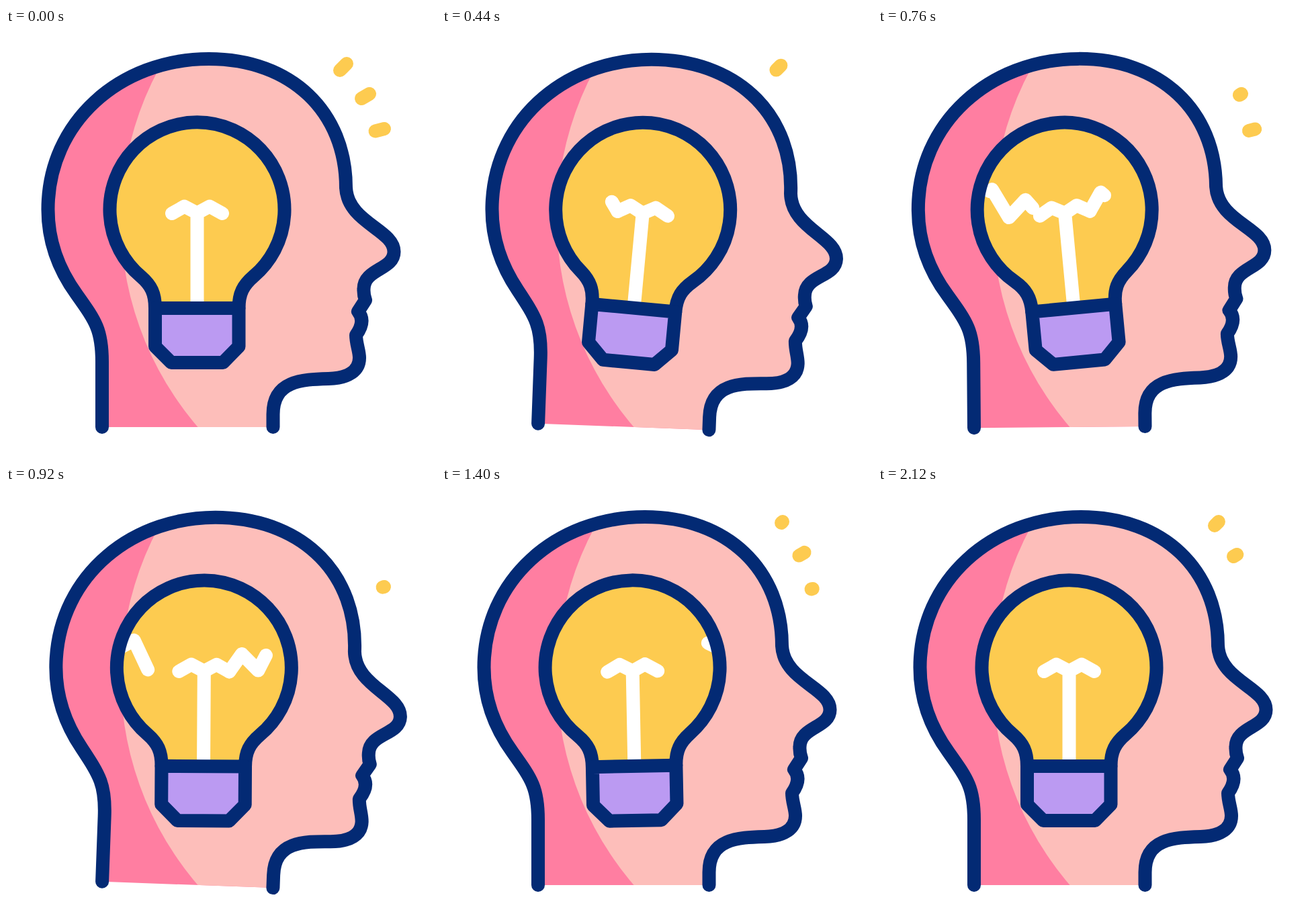
An HTML page that plays this animation: 640x640 px, repeating every 2160 ms.

```html
<!DOCTYPE html>
<html lang="en">
<head>
<meta charset="utf-8">
<title>Bright idea</title>
<style>
  html, body { margin: 0; width: 100%; height: 100%; overflow: hidden; background: #fff; }
  svg { display: block; width: 100%; height: 100%; }
  .line { fill: none; stroke: #032a74; }
  .wire { fill: none; stroke: #fff; }
  .ray { stroke: #fdcb50; }
  svg * { stroke-width: 20; stroke-linecap: round; stroke-linejoin: round; }
</style>
</head>
<body>
<svg viewBox="0 0 640 640">
  <defs>
    <path id="skull" d="M143 594V497C143 450 134 437 105.500 397C80 362 62.500 320 62.500 270
      C62.500 140 170 46 302 46C425 46 506 125 506 238C509 290 577.500 300 577.500 333
      C577.500 360 533 358 532.500 388Q532 397 535 405L524 422Q536 436 521 457
      C521 470 526 480 526 491C526 510 510 521 480 522C440 523 397.500 525 397.500 575V594"/>
    <path id="glass" d="M222 417C222 395 216 383 201 370A130 130 0 1 1 368 370C353 383 346.500 395 346.500 417"/>
    <clipPath id="inHead"><use id="clipSkull" href="#skull"/></clipPath>
    <clipPath id="inGlass"><circle cx="284.500" cy="270" r="126"/></clipPath>
  </defs>
  <use id="back" href="#skull" fill="#ff7ea1"/>
  <g clip-path="url(#inHead)"><circle cx="645" cy="285" r="474" fill="#fdbeba"/></g>
  <use id="outline" href="#skull" class="line"/>
  <g id="bulb">
    <use href="#glass" fill="#fdcb50"/>
    <g class="wire">
      <path d="M284.500 412V274M247 276L265.500 265.500L284.500 275.500L303 265.500L322 276"/>
      <g clip-path="url(#inGlass)">
        <path id="pulseL" d="M247 276L228 250L201 274L180 230L148 247"/>
        <path id="pulseR" d="M322 276L340.500 249.500L365 274L387 230.500L421 248"/>
      </g>
    </g>
    <use href="#glass" class="line"/>
    <path d="M222 417H346.500V474L323 498H246L222 474Z" fill="#bb9af2" stroke="#032a74"/>
  </g>
  <g id="rays"></g>
</svg>
<script>
const LOOP = 2160, STEP = 40;
const $ = id => document.getElementById(id);

// [time, degrees]
const headKeys = [[0, 0], [320, 4], [640, -2.1], [920, 2.1], [1200, 0]];
const bulbKeys = [[0, 0], [360, 4], [780, -5], [1080, 2.2], [1400, -1.1], [1680, 0]];

const pulses = [
  { el: $('pulseL'), head: 390, tail: 712, speed: 0.33 },
  { el: $('pulseR'), head: 640, tail: 975, speed: 0.3 }
];
for (const p of pulses) p.size = p.el.getTotalLength();

// inner end, outer end, start times
const rays = [
  { a: [497, 63], b: [507, 53], starts: [310, 1078, 1900] },
  { a: [529, 105], b: [541, 98], starts: [455, 1230, 2050] },
  { a: [549.5, 153.5], b: [563, 150], starts: [595, 1375] }
];
for (const r of rays) {
  r.el = document.createElementNS('http://www.w3.org/2000/svg', 'line');
  r.el.setAttribute('class', 'ray');
  $('rays').append(r.el);
}

const clamp = v => Math.max(0, Math.min(1, v));

function sway(keys, t) {
  for (let i = 1; i < keys.length; i++) {
    const [t0, v0] = keys[i - 1], [t1, v1] = keys[i];
    if (t < t1) return v0 + (v1 - v0) * (1 - Math.cos(Math.PI * (t - t0) / (t1 - t0))) / 2;
  }
  return 0;
}

const show = (el, on) => el.setAttribute('visibility', on ? 'visible' : 'hidden');

function drawPulse(p, t) {
  const head = Math.min(p.size, (t - p.head) * 0.33);
  const tail = Math.max(0, (t - p.tail) * p.speed);
  const on = head > 0 && tail < head;
  show(p.el, on);
  if (!on) return;
  p.el.setAttribute('stroke-dasharray', `${head - tail} 999`);
  p.el.setAttribute('stroke-dashoffset', -tail);
}

function raySpan(r, t) {
  if (t < 240) return [t / 240, 1];
  const start = r.starts.filter(s => s <= t).pop();
  if (start === undefined) return null;
  const age = t - start;
  if (age > 370) return null;
  return [clamp((age - 120) / 250), 1 - Math.pow(1 - clamp(age / 230), 1.6)];
}

function drawRay(r, t) {
  const span = raySpan(r, t);
  show(r.el, span);
  if (!span) return;
  span.forEach((k, i) => {
    r.el.setAttribute('x' + (i + 1), r.a[0] + (r.b[0] - r.a[0]) * k);
    r.el.setAttribute('y' + (i + 1), r.a[1] + (r.b[1] - r.a[1]) * k);
  });
}

function draw(t) {
  const nod = `rotate(${sway(headKeys, t)} 285 594)`;
  for (const id of ['clipSkull', 'back', 'outline']) $(id).setAttribute('transform', nod);
  $('bulb').setAttribute('transform', `${nod} rotate(${sway(bulbKeys, t)} 284.5 319)`);
  pulses.forEach(p => drawPulse(p, t));
  rays.forEach(r => drawRay(r, t));
}

const origin = performance.now();
function tick() {
  const t = (performance.now() - origin) % LOOP;
  draw(Math.floor(t / STEP) * STEP);
  requestAnimationFrame(tick);
}
tick();
</script>
</body>
</html>
```
